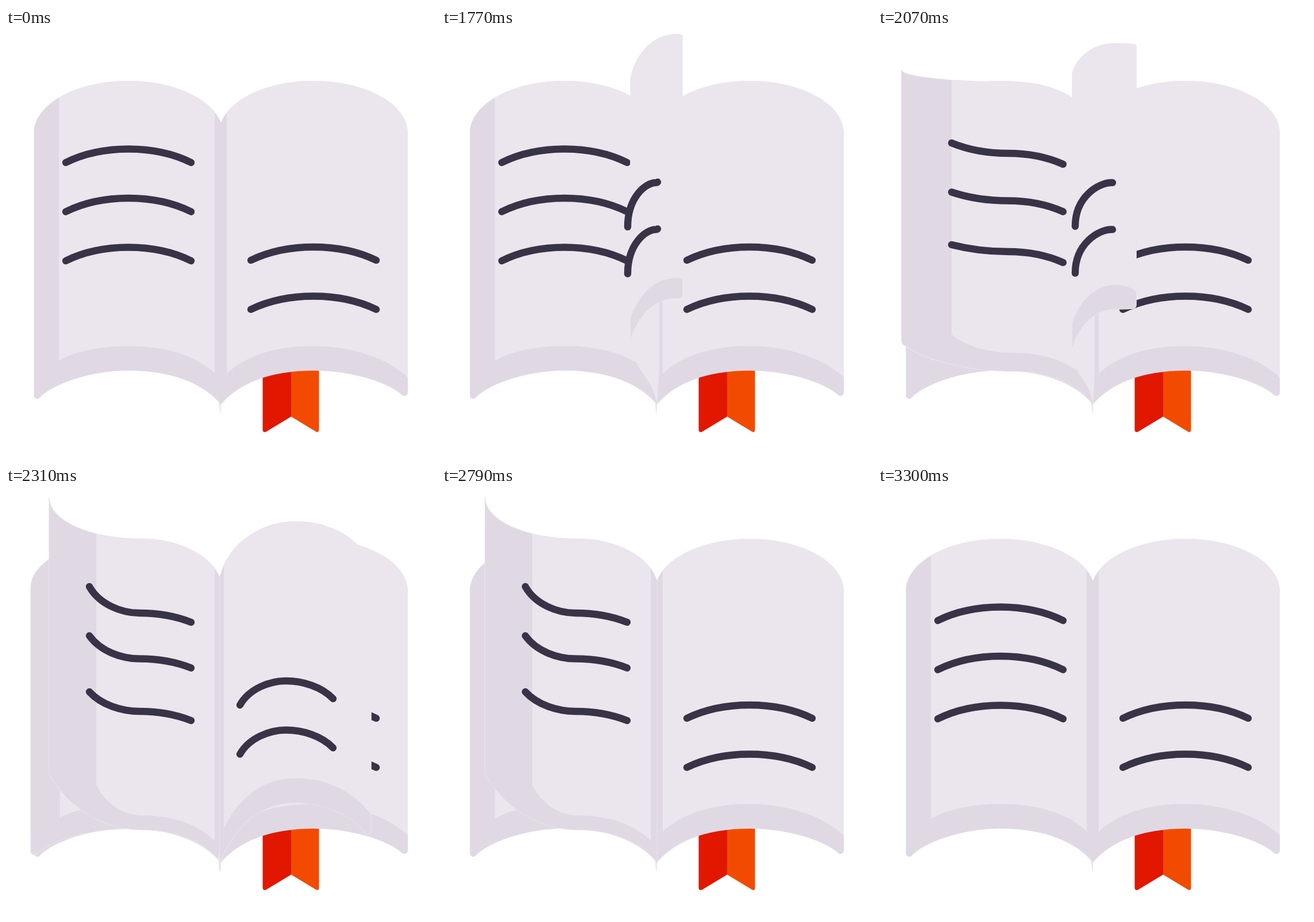
These frames come from a looping animation (748x748 px, 3330 ms). An HTML page with a canvas:

```html
<!DOCTYPE html>
<html lang="en">
<head>
<meta charset="utf-8">
<title>Open book</title>
<style>
  html, body { margin: 0; width: 100%; height: 100%; overflow: hidden; background: #fff; }
  canvas { display: block; width: 748px; height: 748px; }
</style>
</head>
<body>
<canvas id="book" width="748" height="748"></canvas>
<script>
const LOOP = 3330, STEP = 30, SIZE = 748, SPINE = 374, PITCH = 85.5;
const LIGHT = '#ebe6ed', SHADE = '#e0d9e4', INK = '#393347';
const ctx = document.getElementById('book').getContext('2d');

// A page hangs between edge, mid and root, each [x, top, bottom].
// inner is the outer corner of the light panel, band the shade below it,
// line the left, middle and right x, then y, of the first text row.
const REST_RIGHT = {
  edge: [699, 183, 648], mid: [535, 92, 596], root: [SPINE, 165, 655],
  inner: [699, 608], band: 43, gutter: 10,
  line: [426, 535, 644, 404, 381, 404], pitch: PITCH, fan: 0
};
const LIFTED = {
  ...REST_RIGHT, edge: [635, 160, 620], mid: [505, 62, 551], root: [372, 160, 655],
  inner: [635, 572], gutter: 7, line: [407, 487, 569, 381, 339, 370]
};
const CURLED = {
  edge: [449, 30, 487], mid: [413, 27, 489], root: [338, 80, 555],
  inner: [449, 458], band: 42, gutter: 0,
  line: [343, 406, 408, 345, 269, 269], pitch: 81.5, fan: 0
};
const UPRIGHT = {
  ...CURLED, edge: [418, 14, 470], mid: [408, 11, 470], root: [328, 90, 540],
  inner: [418, 438], band: 35, line: [323, 372, 375, 346, 269, 268]
};
const REST_LEFT = {
  ...mapX(REST_RIGHT, x => 2 * SPINE - x), edge: [48.5, 183, 654],
  inner: [92, 579], gutter: 11, line: [104, 213, 322, 234, 210.5, 234]
};
const SWEEPING = {
  ...REST_LEFT, edge: [75, 21, 500], mid: [235, 92, 598],
  inner: [157, 520], band: 25, line: [145, 232, 322, 175, 221, 237], fan: 6
};
const LANDED = {
  ...REST_LEFT, edge: [41, 73, 548], mid: [235, 94, 597],
  inner: [128, 533], band: 32, line: [128, 226, 322, 200, 218, 237], fan: 3
};

// One turn of a page; the visible side swaps at 350 ms
const TURN = [
  [0, REST_RIGHT], [90, LIFTED], [240, CURLED], [270, UPRIGHT], [350, squeeze(UPRIGHT, 300, .15)],
  [350, squeeze(SWEEPING, SPINE, .35)], [510, SWEEPING], [570, LANDED], [950, REST_LEFT]
];
const PAGES = [
  { start: 1500, pace: 1 },
  { start: 1856.7, pace: 8 / 9 },
  { start: 2207.1, pace: 8 / 7 }
];

function mapX(pose, f) {
  const out = { ...pose };
  for (const key of ['edge', 'mid', 'root', 'inner']) out[key] = [f(pose[key][0]), ...pose[key].slice(1)];
  out.line = pose.line.map((v, i) => i < 3 ? f(v) : v);
  return out;
}

function squeeze(pose, center, scale) {
  return mapX(pose, x => center + (x - center) * scale);
}

function mix(a, b, k) {
  if (typeof a === 'number') return a + (b - a) * k;
  if (Array.isArray(a)) return a.map((v, i) => mix(v, b[i], k));
  return Object.fromEntries(Object.keys(a).map(key => [key, mix(a[key], b[key], k)]));
}

function poseAt(age) {
  const i = TURN.findIndex(([end]) => age < end);
  if (i < 1) return null;
  const [from, a] = TURN[i - 1], [to, b] = TURN[i];
  const k = (age - from) / (to - from);
  if (b === REST_LEFT) {
    // settle after swinging a little past the edge of the book
    const pose = mix(a, b, 1 - (1 - k) ** 3);
    pose.edge[0] -= 40 * Math.sin(Math.PI * k) * (1 - k) ** 2;
    return pose;
  }
  // the paper lags behind the text on it
  return { ...mix(a, b, k ** 1.5), line: mix(a.line, b.line, k) };
}

// Cubic from one point to another, its handles given as fractions of the way
function bend(path, [x, y], [X, Y], a, b, c, d) {
  path.bezierCurveTo(mix(x, X, a), mix(y, Y, b), mix(x, X, c), mix(y, Y, d), X, Y);
}

function lowerArc(path, edge, mid, root) {
  bend(path, edge, mid, .2, .6, .6, 1);
  bend(path, mid, root, .48, 0, .82, .4);
}

function outline({ edge, mid, root }) {
  const path = new Path2D();
  const [e, m, r] = [edge, mid, root].map(([x, top]) => [x, top]);
  const [E, M, R] = [edge, mid, root].map(([x, , bottom]) => [x, bottom]);
  path.moveTo(...e);
  path.arcTo(...E, mix(E[0], M[0], .2), mix(E[1], M[1], .6), 6);
  lowerArc(path, E, M, R);
  path.lineTo(...r);
  bend(path, r, m, .1, .59, .52, 1);
  bend(path, m, e, .55, 0, 1, .44);
  path.closePath();
  return path;
}

function panel({ inner, mid, root, band }) {
  const path = new Path2D();
  path.moveTo(inner[0], 0);
  path.lineTo(...inner);
  lowerArc(path, inner, [mid[0], mid[2] - band], [root[0], root[2] - band]);
  path.lineTo(root[0], 0);
  return path;
}

// The part of a curled page that runs from its fold down to the spine
function fold({ mid, root: [x, , y] }) {
  const path = new Path2D(), right = SPINE + (SPINE - x) * .08;
  path.moveTo(x, y);
  path.bezierCurveTo(x, y + 55, 366, 602, SPINE, 655);
  path.lineTo(right, 600);
  path.lineTo(right, mid[2]);
  path.lineTo(x, mid[2]);
  return path;
}

// Steeper text lines start out rounder
function textLine(xl, xm, xr, yl, ym, yr) {
  const path = new Path2D();
  const round = (dx, dy) => Math.max(0, .36 - .3 * Math.abs(dy / dx));
  path.moveTo(xl, yl);
  bend(path, [xl, yl], [xm, ym], round(xm - xl, ym - yl), .68, .65, 1);
  bend(path, [xm, ym], [xr, yr], .35, 0, 1 - round(xr - xm, yr - ym), .32);
  return path;
}

function fill(path, color) {
  ctx.fillStyle = color;
  ctx.fill(path);
}

function stroke(path, color, width) {
  ctx.strokeStyle = color;
  ctx.lineWidth = width;
  ctx.stroke(path);
}

function drawPage(pose, moving) {
  const body = outline(pose), side = Math.sign(pose.edge[0] - pose.root[0]);
  const gutterEnd = pose.root[0] + side * pose.gutter;
  if (side > 0) fill(fold(pose), LIGHT);
  if (moving) stroke(body, LIGHT, 1.5);
  fill(body, SHADE);

  ctx.save();
  ctx.clip(body);
  ctx.beginPath();
  ctx.rect(gutterEnd, 0, side * SIZE, SIZE);
  ctx.clip();
  fill(panel(pose), LIGHT);
  ctx.restore();

  const [xl, xm, xr, yl, ym, yr] = pose.line;
  const rows = side > 0 ? 2 : 3;
  for (let n = 0; n < rows; n++) {
    const dy = n * pose.pitch + n * (n - 2) * pose.fan;
    stroke(textLine(xl, xm, xr, yl + dy + n * pose.fan, ym + dy, yr + dy), INK, 12.4);
  }
}

function draw(t) {
  ctx.fillStyle = '#fff';
  ctx.fillRect(0, 0, SIZE, SIZE);
  fill(new Path2D('M446.5 580H496V676L453 702Q446.5 705 446.5 698Z'), '#e21700');
  fill(new Path2D('M496 580H544.5V698Q544.5 705 539 702L496 676Z'), '#f24b00');
  drawPage(REST_RIGHT);
  drawPage(REST_LEFT);
  for (const { start, pace } of PAGES) {
    const pose = poseAt((t - start) / pace);
    if (pose) drawPage(pose, true);
  }
}

function frame() {
  draw(Math.floor(performance.now() % LOOP / STEP) * STEP);
  requestAnimationFrame(frame);
}

ctx.lineCap = 'round';
ctx.lineJoin = 'round';
frame();
</script>
</body>
</html>
```
